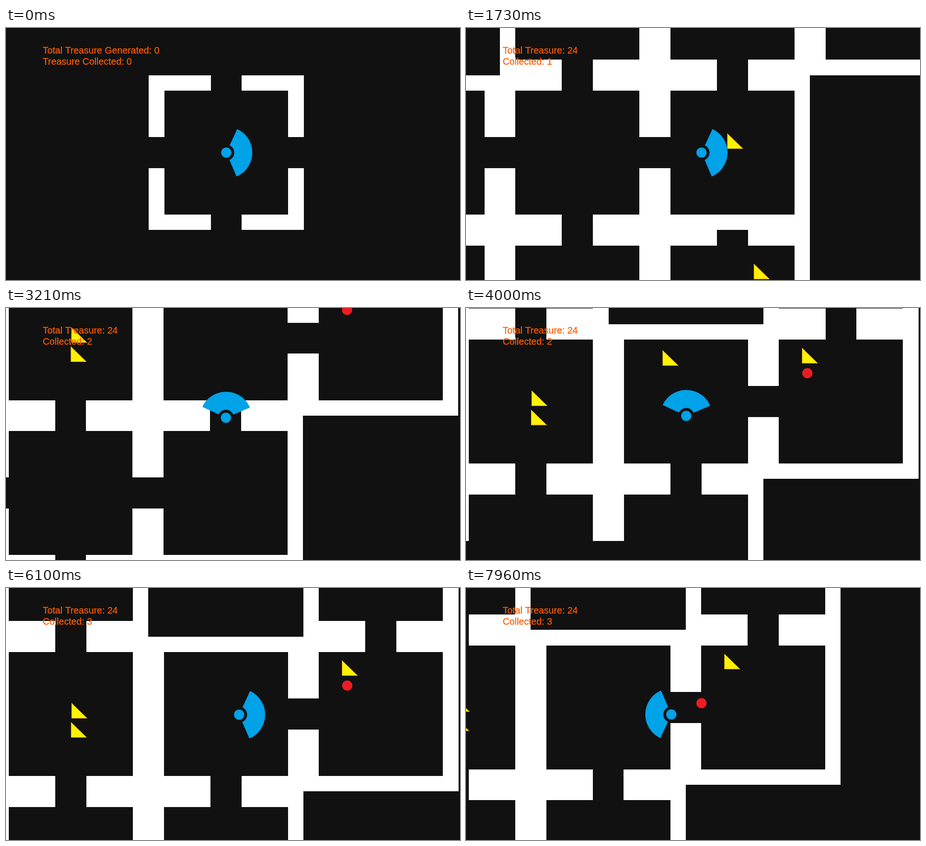
These frames come from a looping animation (977 px wide and 543 px high, 8 s). An HTML page with a canvas:

```html
<!DOCTYPE html>
<html lang="en">
<head>
<meta charset="utf-8">
<title>Treasure rooms</title>
<style>
  html, body { margin: 0; width: 100%; height: 100%; overflow: hidden; background: #111; }
  canvas { display: block; width: 977px; height: 543px; }
</style>
</head>
<body>
<canvas id="stage" width="977" height="543"></canvas>
<script>
const ctx = document.getElementById('stage').getContext('2d');
const LOOP = 8000, FRAME = 77.95, PHASE = 6.65;
const UNIT = 33.36, ROOM = 10 * UNIT;
const CENTER = { x: 474, y: 268.5 };
const SPEED = 0.18, FOLLOW = 0.005, TURN = 0.7; // per ms
const REACH = 25;
const FLOOR = '#111111', WALL = '#ffffff', BLUE = '#00a2e8', RED = '#ed1c24';
const DIRS = { L: [-1, 0], R: [1, 0], U: [0, -1], D: [0, 1], LD: [-1, 1] };

// Open doors of each room; the first cell is column -1, row -2.
const layout = [
  '-  B    -  B',
  '-  UD   RD LU',
  'RD LRUD LU -',
  'U  U    U  -'
].map(row => row.replace(/B/g, 'D').split(/ +/));

const treasures = [
  [410.3, 151.3], [489.3, 125.3], [546.4, 406.2], [450.1, -277.4],
  [168.2, -190.6], [167.1, -149.2], [750.2, -282.4]
];

// Keys held: direction, from, to.
const presses = `R 176 1440, R 1502 2107, U 2252 3000, L 3010 3022, U 3049 4625,
  L 4633 4955, R 4955 5141, D 5207 5686, R 5796 7172,
  L 7468 7671, LD 7671 7748, L 7748 8000`.split(',').map(press => {
  const [key, from, to] = press.trim().split(' ');
  return { dir: DIRS[key], from: +from, to: +to };
});

const clamp = (v, lo, hi) => Math.min(hi, Math.max(lo, v));
const wrap = a => ((a + 180) % 360 + 360) % 360 - 180;

// The player moves at a constant speed; the camera follows it exponentially.
function pose(t) {
  const p = { x: 5 * UNIT, y: 5 * UNIT, lagX: 0, lagY: 0 };
  for (const { dir: [dx, dy], from, to } of presses) {
    const held = clamp(t - from, 0, to - from);
    const idle = Math.max(0, t - to);
    const lag = SPEED / FOLLOW * (1 - Math.exp(-FOLLOW * held)) * Math.exp(-FOLLOW * idle);
    p.x += dx * SPEED * held;
    p.y += dy * SPEED * held;
    p.lagX += dx * lag;
    p.lagY += dy * lag;
  }
  return p;
}

function headingAt(t) {
  let heading = 0;
  presses.forEach(({ dir: [dx, dy], from }, i) => {
    if (t < from) return;
    const until = i + 1 < presses.length ? presses[i + 1].from : LOOP;
    const most = TURN * (Math.min(t, until) - from);
    const goal = Math.atan2(dy, dx) * 180 / Math.PI;
    heading += clamp(wrap(goal - heading), -most, most);
  });
  return heading;
}

function pickupTime([x, y]) {
  for (let t = 0; t < LOOP; t += 20) {
    const p = pose(t);
    if (Math.hypot(p.x - x - 11, p.y - y - 22) < REACH) return t;
  }
  return Infinity;
}
const pickups = treasures.map(pickupTime);

function drawRoom(ox, oy, open) {
  const box = (color, cx, cy, w, h) => {
    const l = Math.round(ox + (cx - w / 2) * UNIT), r = Math.round(ox + (cx + w / 2) * UNIT);
    const t = Math.round(oy + (cy - h / 2) * UNIT), b = Math.round(oy + (cy + h / 2) * UNIT);
    ctx.fillStyle = color;
    ctx.fillRect(l, t, r - l, b - t);
  };
  box(WALL, 5, 5, 10, 10);
  box(FLOOR, 5, 5, 8, 8);
  for (const side of open) {
    const [dx, dy] = DIRS[side];
    box(FLOOR, 5 + 4.5 * dx, 5 + 4.5 * dy, dx ? 1 : 2, dy ? 1 : 2);
  }
}

function drawTreasure(x, y) {
  ctx.beginPath();
  ctx.moveTo(x + 0.7, y + 1.5);
  ctx.lineTo(x + 0.7, y + 32.6);
  ctx.lineTo(x + 32.6, y + 32.6);
  ctx.closePath();
  ctx.fillStyle = '#fff200';
  ctx.fill();
  ctx.strokeStyle = '#ffca18';
  ctx.lineWidth = 1.4;
  ctx.stroke();
}

function disc(x, y, color) {
  ctx.fillStyle = color;
  ctx.beginPath();
  ctx.arc(x, y, 11, 0, 2 * Math.PI);
  ctx.fill();
}

function drawPlayer(x, y, heading) {
  const a = (heading - 65.2) * Math.PI / 180, b = (heading + 66.8) * Math.PI / 180;
  disc(x, y, BLUE);
  ctx.beginPath();
  ctx.arc(x, y, 56, a, b);
  ctx.arc(x, y, 17.2, b, a, true);
  ctx.fill();
}

function drawScore(t) {
  const got = pickups.filter(end => end <= t).length;
  const total = t ? 'Total Treasure: ' + (got ? 24 : 23) : 'Total Treasure Generated: 0';
  const line = (text, y) => {
    ctx.fillText(text, 79, y);
    ctx.strokeText(text, 79, y);
  };
  ctx.font = '20.15px "Liberation Sans", Arial, sans-serif';
  ctx.fillStyle = ctx.strokeStyle = '#ff5c00';
  ctx.lineWidth = 0.3;
  line(total, 55);
  line((got ? 'Collected: ' : 'Treasure Collected: ') + got, 79);
}

function draw(t) {
  const p = pose(t);
  const ox = CENTER.x - p.x + p.lagX, oy = CENTER.y - p.y + p.lagY;
  ctx.fillStyle = FLOOR;
  ctx.fillRect(0, 0, 977, 543);

  // Rooms spread outwards from the first one, one ring per frame.
  layout.forEach((cells, j) => cells.forEach((open, i) => {
    const col = i - 1, row = j - 2;
    const ring = Math.abs(col) + Math.abs(row);
    if (open !== '-' && t >= ring * FRAME) drawRoom(ox + col * ROOM, oy + row * ROOM, open);
  }));

  if (t) {
    treasures.forEach(([x, y], i) => { if (t < pickups[i]) drawTreasure(ox + x, oy + y); });
    const chase = Math.max(0, t - 7200);
    disc(ox + 761.65 - 0.08 * chase, oy - 227.9 + 0.069 * chase, RED);
  }
  drawPlayer(ox + p.x, oy + p.y, headingAt(t));
  drawScore(t);
}

const start = performance.now();
function tick() {
  const now = (performance.now() - start) % LOOP;
  const frame = Math.floor((now - PHASE) / FRAME);
  draw(frame > 0 ? PHASE + frame * FRAME : 0);
  requestAnimationFrame(tick);
}
tick();
</script>
</body>
</html>
```
